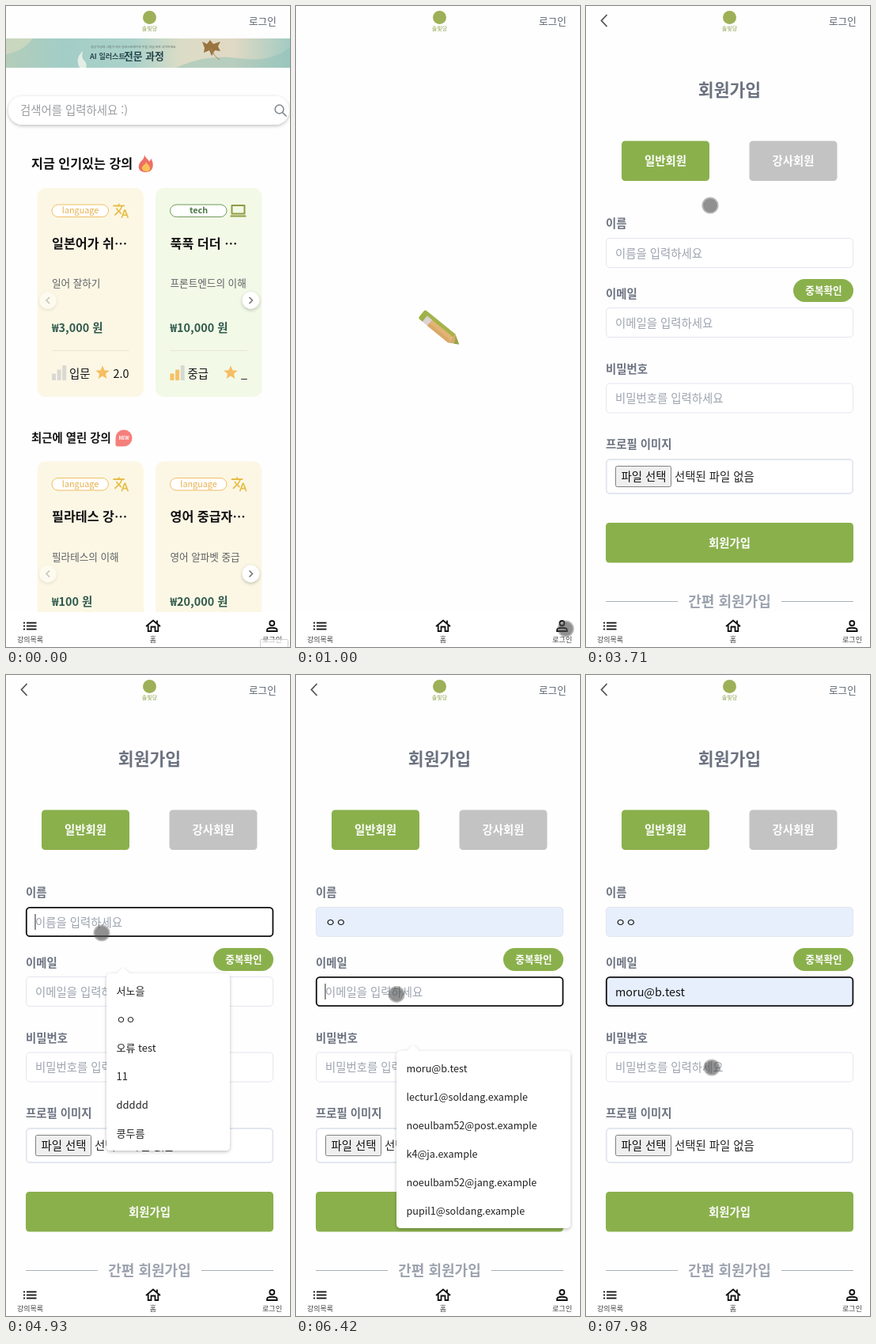
Write an HTML page that moves like this. It is 359x810 px and loops after 8000 ms.

```html
<!DOCTYPE html>
<html lang="ko">
<head>
<meta charset="utf-8">
<title>강의 앱 회원가입</title>
<style>
html, body { margin: 0; width: 100%; height: 100%; overflow: hidden; background: #fefefe; }
svg { display: block; width: 100%; height: 100%; }
text { font-family: "Noto Sans CJK KR", "Noto Sans KR", "Noto Sans CJK JP", "Noto Sans CJK", "Noto Sans", sans-serif; white-space: pre; }
</style>
</head>
<body>
<svg id="stage" viewBox="0 0 359 810" xmlns="http://www.w3.org/2000/svg"></svg>
<script>
const LOOP = 8000;
const GREEN = '#8ab04c', GRAY = '#6b7280', PALE = '#9ca3af', LINE = '#e3e6ef', FILLED = '#e7effd';
const YELLOW = '#ecba4b';

// Markup helpers; text is placed by its vertical centre.
const text = (x, cy, size, str, fill = '#111', weight = 400, anchor = 'start') =>
  `<text x="${x}" y="${(cy + size * 0.37).toFixed(2)}" font-size="${size}" fill="${fill}" font-weight="${weight}" text-anchor="${anchor}">${str}</text>`;
const mid = (x, cy, size, str, fill, weight) => text(x, cy, size, str, fill, weight, 'middle');
const rect = (x, y, w, h, r, fill, more = '') =>
  `<rect x="${x}" y="${y}" width="${w}" height="${h}" rx="${r}" fill="${fill}" ${more}/>`;
const circle = (x, y, r, fill, more = '') => `<circle cx="${x}" cy="${y}" r="${r}" fill="${fill}" ${more}/>`;
const path = (d, fill, more = '') => `<path d="${d}" fill="${fill}" ${more}/>`;
const stroke = (d, color, width, more = '') => path(d, 'none', `stroke="${color}" stroke-width="${width}" ${more}`);
const group = (id, body, more = '') => `<g id="${id}" ${more}>${body}</g>`;
const box = (x, y, w, h, width = 1, fill = '#fff') =>
  rect(x + 0.5, y + 0.5, w - 1, h - 1, 4.5, fill, `stroke="${LINE}" stroke-width="${width}"`);
const button = (x, y, w, h, label, fill = GREEN) =>
  rect(x, y, w, h, 4.5, fill) + mid(x + w / 2, y + h / 2 + 0.2, 14.4, label, '#fff', 700);
const divider = (x1, x2, x3, x4, y, label) =>
  stroke(`M${x1} ${y + 0.5}H${x2}M${x3} ${y + 0.5}H${x4}`, '#a9b0bb', 1) + mid(181.5, y, 18, label, PALE, 700);

function star(cx, cy, r) {
  const pts = [...Array(10)].map((_, i) => {
    const a = i * Math.PI / 5 - Math.PI / 2, k = i % 2 ? r * 0.45 : r;
    return (cx + k * Math.cos(a)).toFixed(1) + ',' + (cy + k * Math.sin(a)).toFixed(1);
  });
  return `<polygon points="${pts.join(' ')}" fill="#f6bd62"/>`;
}

const translateIcon = (x, y) => path('M12.87 15.07l-2.54-2.51.03-.03A17.52 17.52 0 0 0 14.07 6H17V4h-7V2H8v2H1v1.99h11.17C11.5 7.92 10.44 9.75 9 11.35 8.07 10.32 7.3 9.19 6.69 8h-2c.73 1.63 1.73 3.17 2.98 4.56l-5.09 5.02L4 19l5-5 3.11 3.11.76-2.04zM18.5 10h-2L12 22h2l1.12-3h4.75L21 22h2l-4.5-12zm-2.62 7l1.62-4.33L19.12 17h-3.24z',
  '#e6bd47', `transform="translate(${x} ${y}) scale(.9)"`);
const laptopIcon = (x, y) => stroke(`M${x + 2} ${y + 3}h16v10.5h-16z`, '#909c42', 2, 'stroke-linejoin="round"') +
  rect(x, y + 15.5, 20, 2, 0.5, '#909c42');

function card(x, y, c) {
  const tx = x + 18.5, tech = c.tag === 'tech', edge = tech ? '#6f9a58' : '#f0bd62';
  let s = rect(x, y, 134.5, 264, 11, tech ? '#f2f9e7' : '#fcf7e5') +
    rect(tx, y + 21, 71.5, 15.5, 7.8, '#fff', `stroke="${edge}"`) +
    mid(tx + 36, y + 28.4, 10.8, c.tag, tech ? '#4d7a45' : '#e9b04a', tech ? 700 : 500) +
    (tech ? laptopIcon(x + 94.5, y + 19) : translateIcon(x + 95, y + 18)) +
    text(tx, y + 70, 16.2, c.title + '⋯', '#111', 700) +
    text(tx, y + 120.5, 12.6, c.note, '#5d6063', 500) +
    text(tx, y + 177, 14.4, '₩' + c.price + ' 원', '#2f5a4c', 700);
  if (!c.level) return s;
  s += stroke(`M${tx} ${y + 205.5}h97.5`, '#e9e6d6', 1);
  [8.5, 13.5, 19].forEach((h, i) => {
    s += rect(tx + i * 6.6, y + 243 - h, 5, h, 0.8, i < c.bars ? '#f6c165' : '#d9d8d2');
  });
  return s + text(tx + 22, y + 234.5, 14.4, c.level) + star(x + c.star, y + 233.5, 9.2) +
    text(x + 116, y + 234.5, 14.4, c.score, '#111', 400, 'middle').replace('x="' + (x + 116) + '"', `x="${x + c.scoreX}"`);
}

const arrow = (x, y, dir, alpha) => `<g opacity="${alpha}">` + circle(x, y, 10.7, '#fff', 'filter="url(#soft)"') +
  stroke(`M${x - 2 * dir} ${y - 4}l${4 * dir} 4l${-4 * dir} 4`, '#777', 1.6) + '</g>';

const banner = rect(0, 41, 359, 37, 0, 'url(#sky)') +
  path('M0 41h34q-12 16-34 20z', '#d5dcc0', 'opacity=".7"') +
  path('M215 78q40-18 80-12t64-14v26z', '#8fc1b8', 'opacity=".5"') +
  path('M93 78q-6-12 4-21q-2 9 2 12q4 4 2 9z', '#eef3ea', 'opacity=".85"') +
  path('M248 45l6 3l4-5l4 5l9-3l-3 6l3 6l-7-1l-4 7l-3-7l-7 3l1-6z', '#9a7440') +
  stroke('M259 53q3 10 11 15', '#a98756', 1) +
  text(107, 51.5, 3.8, '상상 이상의 그림이 되는 일러스트레이션 수업, 지금 바로 시작하세요', '#5b6b66') +
  text(106, 64, 9.1, 'AI 일러스트', '#2d4a52', 700) +
  text(149, 63.5, 12.8, '전문 과정', '#24434b', 700);

const home = banner +
  rect(3, 114, 355, 36, 18, '#fff', 'filter="url(#soft)"') +
  text(18, 132, 14.4, '검색어를 입력하세요 :)', '#9b9da1', 500) +
  circle(345.5, 130.5, 5.4, 'none', 'stroke="#7d858c" stroke-width="1.5"') + stroke('M349.5 134.5l5 5', '#7d858c', 1.6) +
  text(32, 199, 16.2, '지금 인기있는 강의', '#111', 700) +
  path('M175 187.500c1 5 5 6 6 9c1-1 2-2 2-4c4 5 5 17-6 17.500c-11 0-11-9-6-14c3-3 4-5 4-8.500z', '#ee6f63') +
  path('M177 197c1 3 5 4 5 8c0 3-2 4-5 4s-5-2-5-4c0-4 4-4 5-8z', '#f8c257') +
  card(39.5, 230, { tag: 'language', title: '일본어가 쉬', note: '일어 잘하기', price: '3,000', level: '입문', bars: 0, star: 82.5, score: '2.0', scoreX: 106 }) +
  card(189, 230, { tag: 'tech', title: '푹푹 더더 ', note: '프론트엔드의 이해', price: '10,000', level: '중급', bars: 2, star: 95, score: '_', scoreX: 112 }) +
  arrow(53, 372, -1, 0.4) + arrow(309.5, 372, 1, 1) +
  text(32, 546, 14.4, '최근에 열린 강의', '#111', 700) +
  circle(149, 546, 10.5, '#f57f7b') + rect(138.5, 546, 10.5, 10.5, 2, '#f57f7b') + mid(149, 546, 5.8, 'NEW', '#fff', 700) +
  card(39.5, 575.5, { tag: 'language', title: '필라테스 강', note: '필라테스의 이해', price: '100' }) +
  card(189, 575.5, { tag: 'language', title: '영어 중급자', note: '영어 알파벳 중급', price: '20,000' }) +
  arrow(53, 717.5, -1, 0.4) + arrow(309.5, 717.5, 1, 1);

const pencil = rect(-30, -7, 9, 14, 2.5, '#9db247') +
  rect(-23, -7, 8, 14, 0, '#ddd2d6') +
  rect(-15, -7, 34, 14, 0, '#e1b474') +
  rect(-25, -7, 45, 4.5, 0, '#a3b44a') + rect(-15, 3, 34, 4, 0, '#d9a968') +
  path('M19-7L31 0L19 7z', '#d5ab70') + path('M20-6.500L31 0L25.500 3.500L24-1z', '#93a443');

const login = mid(181.5, 106, 21.6, '로그인', GRAY, 700) +
  text(68, 182, 14.4, '이메일', GRAY, 700) + box(68, 199, 227, 38) +
  text(80, 219, 14.4, '이메일을 입력하세요', PALE, 500) +
  text(68, 277, 14.4, '비밀번호', GRAY, 700) + box(68, 294.5, 227, 38) +
  text(80, 314, 14.4, '비밀번호를 입력하세요', PALE, 500) +
  button(68, 369, 227, 50, '로그인') +
  divider(68, 124, 239, 295, 489, '간편 로그인') +
  rect(85, 524, 34, 34, 0, '#06cf5d') + circle(181, 541, 16.5, '#3a1d1e') + circle(261, 541, 16.2, '#4285f4') +
  text(68, 608, 12.6, '아직 솔빛당 회원이 아니신가요', PALE, 500) + text(68, 627, 12.6, '?', PALE, 500) +
  text(242.5, 606, 14.4, '회원가', '#7b818c', 500) + text(242.5, 628, 14.4, '입', '#7b818c', 500);

const field = (id, y, hint) => box(25, y, 313, 38) +
  group(id + 'Fill', rect(25.5, y + 0.5, 312, 37, 4.5, FILLED, `stroke="${LINE}"`)) +
  group(id + 'Hint', text(37, y + 19.3, 14.4, hint, PALE, 500)) +
  `<g id="${id}Value"></g>` +
  group(id + 'Focus', rect(25.8, y + 0.8, 311.6, 36.4, 4.5, 'none', 'stroke="#111" stroke-width="1.8"')) +
  group(id + 'Caret', rect(36.5, y + 9, 1, 20, 0, '#222'));

const names = ['서노을', 'ㅇㅇ', '오류 test', '11', 'ddddd', '콩두름'];
const mails = ['moru@b.test', 'lectur1@soldang.example', 'noeulbam52@post.example', 'k4@ja.example', 'noeulbam52@jang.example', 'pupil1@soldang.example'];
const menu = (id, y, w, size, items) => group(id,
  path(`M133 ${y}H140L148 ${y - 7}L156 ${y}H${121 + w}q6 0 6 6V${y + 218}q0 6-6 6H133q-6 0-6-6V${y + 6}q0-6 6-6z`, '#fff', 'filter="url(#soft)"') +
  items.map((s, i) => text(139.5, y + 22 + i * 36, size, s, '#222')).join(''));

const signup = mid(181.5, 106, 21.6, '회원가입', GRAY, 700) +
  button(45, 170.5, 111, 50.5, '일반회원') + button(206.5, 170.5, 111, 50.5, '강사회원', '#c3c3c3') +
  text(25, 275, 14.4, '이름', GRAY, 700) + field('name', 293, '이름을 입력하세요') +
  text(25, 364, 14.4, '이메일', GRAY, 700) +
  rect(262, 345, 76, 29, 14.5, GREEN) + mid(300.5, 359.8, 12.6, '중복확인', '#fff', 700) +
  field('mail', 381, '이메일을 입력하세요') +
  text(25, 459, 14.4, '비밀번호', GRAY, 700) + box(25, 476.5, 313, 38) +
  text(37, 496, 14.4, '비밀번호를 입력하세요', PALE, 500) +
  text(25, 554, 14.4, '프로필 이미지', GRAY, 700) + box(25.3, 572.5, 312.4, 44, 1.8) +
  rect(37.5, 581.5, 70, 26, 2, '#efefef', 'stroke="#808080"') +
  text(44.5, 595, 14.4, '파일 선택', '#111') + text(112, 595, 14.4, '선택된 파일 없음', '#222') +
  button(25, 653, 313, 50.5, '회원가입') +
  divider(25, 116, 247, 338, 752, '간편 회원가입') +
  menu('nameMenu', 377, 156, 13, names) + menu('mailMenu', 475, 220, 12.6, mails);

const header = rect(0, 0, 359, 40, 0, '#fefefe') +
  circle(181.5, 14.5, 8.5, '#9db058') + mid(181.5, 28, 7, '솔빛당', '#8da048', 500) +
  text(307, 19, 12.6, '로그인', '#5c6570', 500) +
  group('back', stroke('M26.500 11L19.500 18.500L26.500 26', '#555', 1.8));

const nav = rect(0, 766, 359, 44, 0, '#fff') +
  [779.5, 783.5, 787.5].map(y => rect(22, y - 0.9, 2, 1.8, 0, '#111') + rect(26, y - 0.9, 12.5, 1.8, 0, '#111')).join('') +
  stroke('M177 784L186 776.500L195 784M179.700 782V790H183.500V784.500H188.500V790H192.300V782M191 780V776.500', '#111', 1.8) +
  circle(336.3, 780, 3, 'none', 'stroke="#111" stroke-width="1.8"') +
  stroke('M330 790V788.500C330 784.800 342.600 784.800 342.600 788.500V790z', '#111', 1.8) +
  mid(30.5, 800.5, 9, '강의목록', '#444', 400) + mid(186, 800.5, 9, '홈', '#444', 400) + mid(336.5, 800.5, 9, '로그인', '#444', 400);

document.getElementById('stage').innerHTML =
  `<defs>
    <filter id="soft" x="-20%" y="-30%" width="140%" height="170%"><feDropShadow dx="0" dy="1.5" stdDeviation="2" flood-color="#000" flood-opacity=".26"/></filter>
    <linearGradient id="sky"><stop offset="0" stop-color="#b3cdba"/><stop offset=".2" stop-color="#a2cdc6"/><stop offset=".45" stop-color="#abd2ca"/><stop offset=".62" stop-color="#dcdcc6"/><stop offset=".8" stop-color="#e0d9c4"/><stop offset="1" stop-color="#a3cbc3"/></linearGradient>
  </defs>` + rect(0, 0, 359, 810, 0, '#fefefe') +
  group('home', home) + group('loader', pencil) + group('login', login) + group('signup', signup) +
  header + nav +
  group('tip', rect(321.5, 800.5, 35, 12, 1, '#fff', 'fill-opacity=".6" stroke="#cfcfcf"')) +
  group('cursor', circle(0, 0, 10.6, '#555', 'fill-opacity=".45"') + circle(0, 0, 8.8, '#4a4a4a', 'fill-opacity=".42"'));

const el = {};
document.querySelectorAll('g[id]').forEach(g => { el[g.id] = g; });
const show = (id, on) => { el[id].style.display = on ? '' : 'none'; };

// Pointer stops: time, x, y
const stops = [
  [460, 341, 800], [700, 341, 787], [1500, 341, 787], [2090, 260, 604], [3270, 260, 604], [3350, 260, 611],
  [3710, 157, 252], [3950, 157, 252], [4020, 157, 245], [4270, 121, 326], [4980, 121, 326], [5400, 150, 436],
  [5700, 150, 436], [5960, 127, 403], [6400, 127, 403], [6900, 157, 508], [7500, 157, 508], [7980, 159, 496]
];
const presses = [[590, 730], [2290, 2420], [4330, 4460], [5480, 5610], [5960, 6090], [7360, 7480]];
const within = (t, a, b) => t >= a && t < b;

function pointer(t) {
  const i = stops.findIndex(s => s[0] > t);
  if (i < 0) return stops[stops.length - 1].slice(1);
  if (i === 0) return stops[0].slice(1);
  const [t0, x0, y0] = stops[i - 1], [t1, x1, y1] = stops[i];
  const u = (t - t0) / (t1 - t0), k = u * u * (3 - 2 * u);
  return [x0 + (x1 - x0) * k, y0 + (y1 - y0) * k];
}

function setField(id, value, filled, focused, caret) {
  show(id + 'Fill', filled);
  show(id + 'Hint', !value);
  show(id + 'Focus', focused);
  show(id + 'Caret', caret);
  if (el[id].value !== value) {
    el[id].value = value;
    el[id + 'Value'].innerHTML = value ? text(37, id === 'name' ? 312.3 : 400.8, 14.4, value) : '';
  }
}
el.name = {};
el.mail = {};

function draw(t) {
  show('home', t < 730);
  show('loader', within(t, 730, 1190));
  show('login', within(t, 1190, 2880));
  show('signup', t >= 2880);
  show('back', t >= 1190);
  show('tip', t < 130);
  el.tip.setAttribute('opacity', t < 70 ? 1 : 0.5);
  const turn = 39 + 12 * Math.sin((t - 1000) / 110);
  el.loader.setAttribute('transform', `translate(182 408) rotate(${turn})`);

  const [x, y] = pointer(t);
  const down = presses.some(p => within(t, p[0], p[1]));
  show('cursor', t >= 460);
  el.cursor.setAttribute('transform', `translate(${x} ${y}) scale(${down ? 1.08 : 1})`);
  el.cursor.setAttribute('opacity', down ? 1 : 0.92);

  // Hovering a suggestion previews it in the field.
  show('nameMenu', within(t, 4460, 5610));
  show('mailMenu', within(t, 6090, 7480));
  const overNames = within(t, 4980, 5610) && y > 381;
  const name = t >= 5610 ? names[1] : overNames ? names[y > 417 ? 1 : 0] : '';
  setField('name', name, !!name, within(t, 4400, 5960), within(t, 4930, 5430));
  const mail = t >= 6420 && (y > 480 || t >= 7480) ? mails[0] : '';
  setField('mail', mail, !!mail, t >= 5960, within(t, 6090, 6660) || within(t, 7160, 7480));
}

function tick() {
  draw(performance.now() % LOOP);
  requestAnimationFrame(tick);
}
tick();
</script>
</body>
</html>
```
